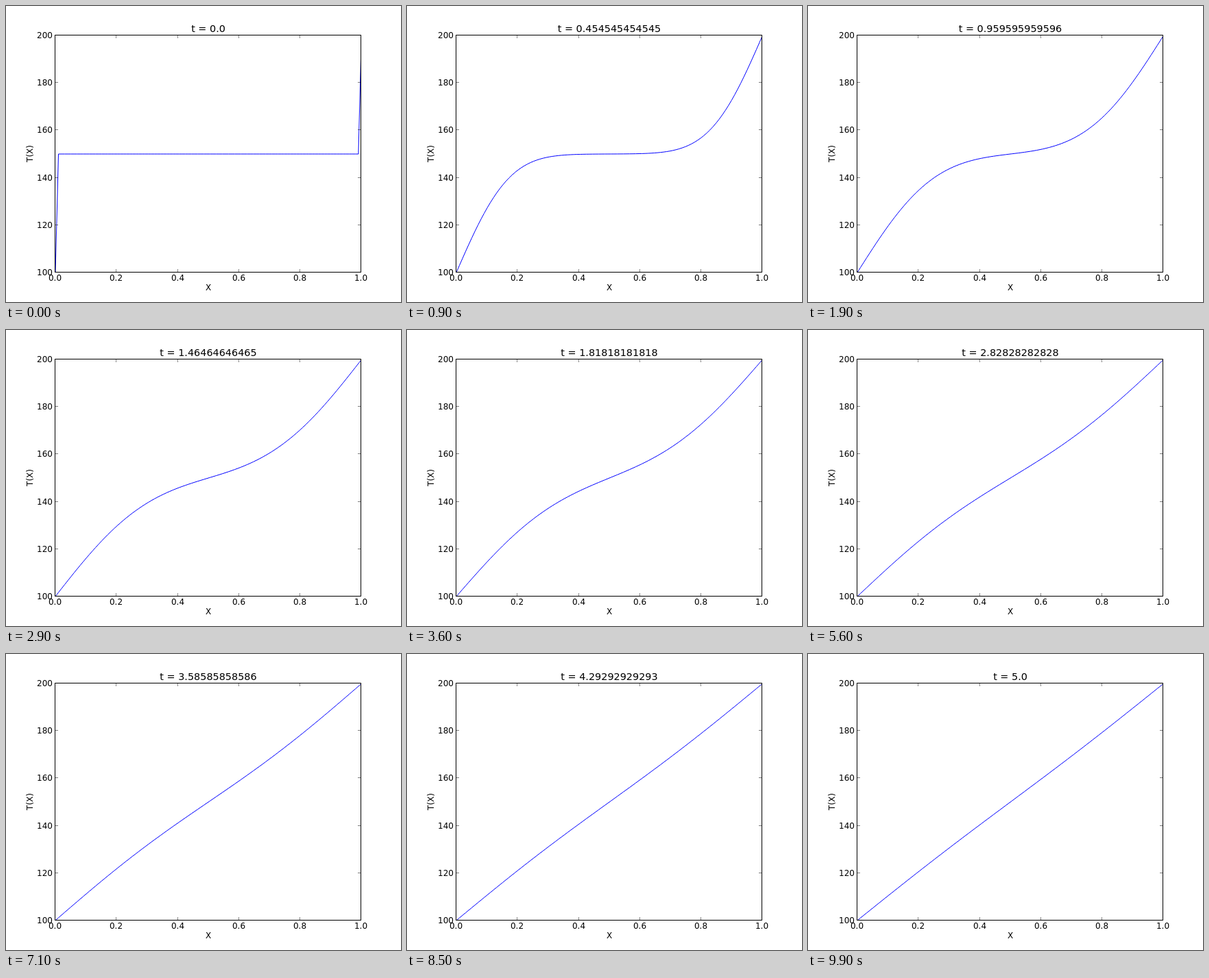
Animation, 576 px wide and 432 px high, one loop 10000 ms. Source, as an HTML page:

```html
<!DOCTYPE html>
<html lang="en">
<head>
<meta charset="utf-8">
<title>Heat diffusion</title>
<style>
  html, body { margin: 0; width: 100%; height: 100%; overflow: hidden; background: #fff; }
  svg { display: block; }
  text { font: 12px "DejaVu Sans", sans-serif; text-anchor: middle; }
  #title { font-size: 14.4px; }
  .ytick { text-anchor: end; }
  .tick { stroke: #000; stroke-width: 0.5; }
</style>
</head>
<body>
<svg width="576" height="432" viewBox="0 0 576 432">
  <clipPath id="area"><rect x="72" y="43" width="446" height="346"/></clipPath>
  <path id="curve" fill="none" stroke="#00f" clip-path="url(#area)"/>
  <g id="axes"></g>
  <rect x="71.5" y="42.5" width="446" height="346" fill="none" stroke="#000"/>
  <text id="title" x="295" y="38"></text>
  <text x="295" y="415">X</text>
  <text transform="translate(39 215.5) rotate(-90)">T(X)</text>
</svg>
<script>
const FRAMES = 100, FRAME_MS = 100, END_TIME = 5;
const POINTS = 100, DIFFUSIVITY = 0.02, MODES = 30;
const curve = document.getElementById('curve');
const title = document.getElementById('title');

const px = x => 72 + 446.4 * x;
const py = temp => 388.8 - 3.456 * (temp - 100);
const snap = v => Math.round(v) - 0.5;

function drawAxes() {
  const line = (x1, y1, x2, y2) =>
    `<line class="tick" x1="${x1}" y1="${y1}" x2="${x2}" y2="${y2}"/>`;
  let out = '';
  for (let k = 0; k <= 5; k++) {
    const x = snap(px(k / 5)), y = snap(py(100 + 20 * k));
    out += line(x, 388, x, 384) + line(x, 43, x, 47);
    out += line(72, y, 76, y) + line(517, y, 513, y);
    out += `<text x="${x}" y="401">${(k / 5).toFixed(1)}</text>`;
    out += `<text class="ytick" x="68" y="${y + 4.5}">${100 + 20 * k}</text>`;
  }
  document.getElementById('axes').innerHTML = out;
}

// Fourier solution for a rod at 150 whose ends are held at 100 and 200.
function temperature(x, t) {
  if (x === 0) return 100;
  if (x === 1) return 200;
  if (t === 0) return 150;
  let temp = 100 + 100 * x;
  for (let k = 1; k <= MODES; k++) {
    const w = 2 * Math.PI * k;
    temp += 200 / w * Math.sin(w * x) * Math.exp(-DIFFUSIVITY * w * w * t);
  }
  return temp;
}

function formatTime(t) {
  const s = String(Number(t.toPrecision(12)));
  return s.includes('.') ? s : s + '.0';
}

let shown = -1;
function render(ms) {
  const step = Math.floor(ms / FRAME_MS) % FRAMES;
  if (step === shown) return;
  shown = step;
  const t = END_TIME * step / (FRAMES - 1);
  const points = Array.from({ length: POINTS }, (_, i) => {
    const x = i / (POINTS - 1);
    return px(x).toFixed(2) + ' ' + py(temperature(x, t)).toFixed(2);
  });
  curve.setAttribute('d', 'M' + points.join('L'));
  title.textContent = 't = ' + formatTime(t);
}

drawAxes();
render(0);
let start;
requestAnimationFrame(function tick(now) {
  start ??= now;
  render(now - start);
  requestAnimationFrame(tick);
});
</script>
</body>
</html>
```
